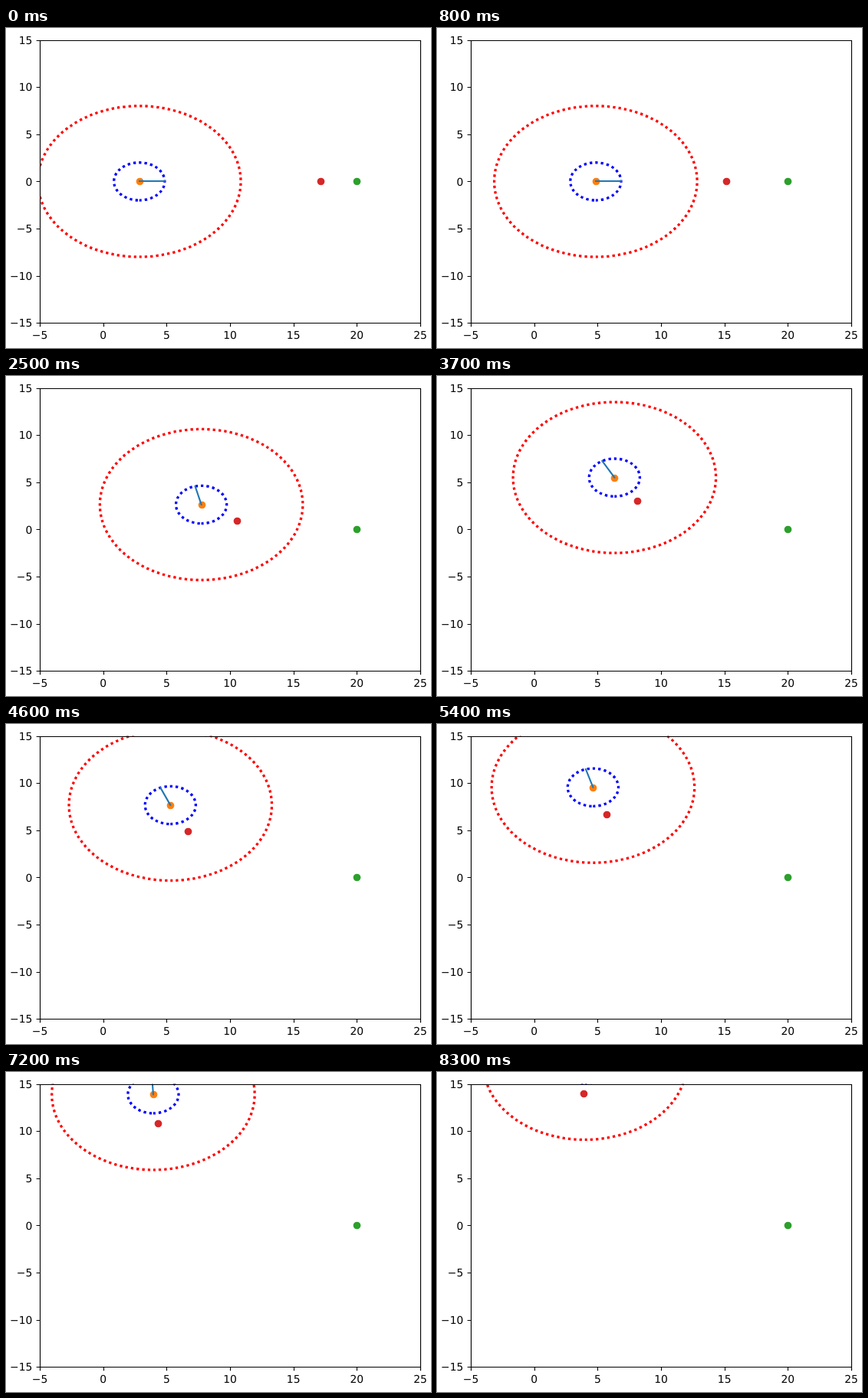
These frames come from a looping animation (554x418 px, 8400 ms). An HTML page:

```html
<!DOCTYPE html>
<html lang="en">
<head>
<meta charset="utf-8">
<title>Pursuit and avoidance</title>
<style>
  html, body { margin: 0; width: 554px; height: 418px; overflow: hidden; background: #fff; }
  svg { display: block; }
  text { font: 13.89px "DejaVu Sans", sans-serif; text-rendering: geometricPrecision; }
  .range { fill: none; stroke-width: 3.3; stroke-dasharray: 3.3 4.06; stroke-dashoffset: 0.26; }
  .axes { fill: none; stroke: #000; stroke-width: 1.11; }
</style>
</head>
<body>
<svg width="554" height="418" viewBox="0 0 554 418">
  <clipPath id="plot"><rect x="44" y="15.6" width="496" height="369.6"/></clipPath>
  <g clip-path="url(#plot)">
    <g id="ranges">
      <path class="range" stroke="#f00" d="M0 98.56A132.27 98.56 0 0 0 0-98.56A132.27 98.56 0 0 0 0 98.56Z"/>
      <path class="range" stroke="#00f" d="M0 24.64A33.07 24.64 0 0 0 0-24.64A33.07 24.64 0 0 0 0 24.64Z"/>
    </g>
    <circle id="agent" r="4.86" fill="#ff7f0e"/>
    <line id="heading" stroke="#1f77b4" stroke-width="2.08" stroke-linecap="square"/>
    <circle id="goal" r="4.86" fill="#2ca02c"/>
    <circle id="chaser" r="4.86" fill="#d62728"/>
  </g>
  <g id="axes"><path class="axes" d="M44.5 16.5H540.5V385.5H44.5Z"/></g>
</svg>
<script>
const LOOP = 8400, STEP_MS = 147, STEP_LENGTH = 0.4, HEADING_LENGTH = 2;

// turns: [step, heading in degrees], linear in between
const agent = {
  x: 2.85,
  turns: [[9, 0], [10, 31], [14, 65], [17, 104], [20, 117], [25, 119], [31, 113], [46, 94], [55, 86]]
};
const chaser = {
  x: 17.15,
  turns: [[10, 180], [17, 145], [25, 135], [31, 122], [55, 93.5]]
};

const $ = id => document.getElementById(id);
const toX = x => 44 + (x + 5) * 496 / 30;
const toY = y => 200.4 - y * 12.32;
const snap = v => Math.round(v) + 0.5;
const clamp = v => Math.min(Math.max(v, 0), 1);

function set(node, attrs) {
  for (const name in attrs) node.setAttribute(name, attrs[name]);
  return node;
}

function add(tag, attrs, text = "") {
  const node = document.createElementNS("http://www.w3.org/2000/svg", tag);
  node.textContent = text;
  $("axes").append(set(node, attrs));
}

function drawAxes() {
  const label = v => String(v).replace("-", "\u2212");
  for (let i = 0; i < 7; i++) {
    const x = toX(5 * i - 5), y = toY(5 * i - 15);
    add("path", { class: "axes", d: `M${snap(x)} 385.5v4.86M44.5 ${snap(y)}h-4.86` });
    add("text", { x, y: 406, "text-anchor": "middle" }, label(5 * i - 5));
    add("text", { x: 34.3, y: Math.round(y + 5.2), "text-anchor": "end" }, label(5 * i - 15));
  }
}

// The simulation slows down a little between 4.6 s and 6.5 s
const stepAt = time => Math.floor((time - 195 * clamp((time - 4600) / 1900)) / STEP_MS);

// Each turn adds its share once the step has passed it
function headingAt(turns, step) {
  let degrees = turns[0][1];
  for (let i = 1; i < turns.length; i++) {
    const [from, a] = turns[i - 1], [to, b] = turns[i];
    degrees += (b - a) * clamp((step - from) / (to - from));
  }
  return degrees * Math.PI / 180;
}

function walk({ x, turns }, steps) {
  let y = 0, angle = headingAt(turns, 0);
  for (let n = 1; n <= steps; n++) {
    angle = headingAt(turns, n);
    x += STEP_LENGTH * Math.cos(angle);
    y += STEP_LENGTH * Math.sin(angle);
  }
  return { x, y, angle };
}

const place = (id, { x, y }) => set($(id), { cx: snap(toX(x)), cy: snap(toY(y)) });

function draw(time) {
  const steps = stepAt(time);
  const { x, y, angle } = walk(agent, steps);
  const crisp = angle ? v => v : Math.round;
  set($("ranges"), { transform: `translate(${toX(x)} ${toY(y)})` });
  set($("heading"), {
    x1: crisp(toX(x)), y1: crisp(toY(y)),
    x2: crisp(toX(x + HEADING_LENGTH * Math.cos(angle))),
    y2: crisp(toY(y + HEADING_LENGTH * Math.sin(angle)))
  });
  place("agent", { x, y });
  place("chaser", walk(chaser, steps));
}

drawAxes();
place("goal", { x: 20, y: 0 });
const start = performance.now();
function tick() {
  draw((performance.now() - start) % LOOP);
  requestAnimationFrame(tick);
}
tick();
</script>
</body>
</html>
```
